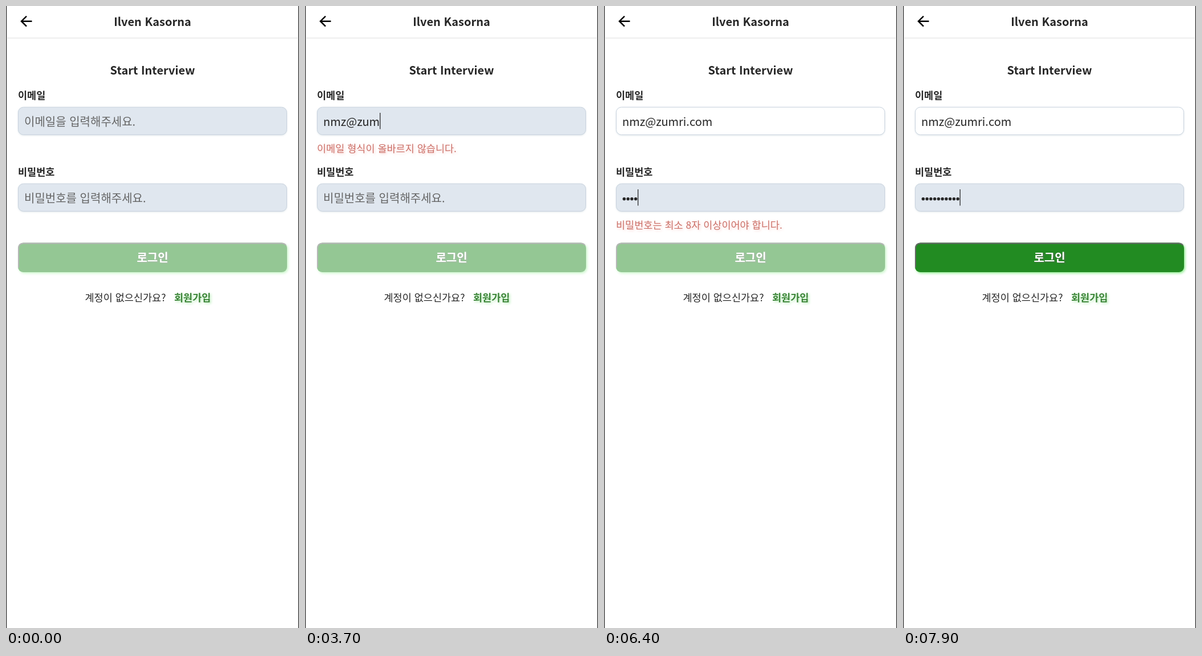
An HTML page for the animation above (8000 ms loop, 514 px wide and 1089 px high).

```html
<!DOCTYPE html>
<html lang="ko">
<head>
<meta charset="utf-8">
<title>Login form</title>
<style>
  html, body { margin: 0; width: 100%; height: 100%; overflow: hidden; background: #fff; }
  svg { display: block; width: 514px; height: 1089px;
        font: 17.5px "Noto Sans CJK KR", "Noto Sans CJK", "Noto Sans CJK JP", sans-serif; fill: #262626; }
  text { white-space: pre; }
  .title { font-size: 20px; font-weight: 700; text-anchor: middle; }
  .label { font-weight: 600; }
  .field { fill: #e0e7ef; stroke: #c8d2dd; filter: drop-shadow(0 1px 1.5px rgba(120, 150, 170, .22)); }
  .value { font-size: 20px; }
  .hint { font-size: 20px; fill: #646464; }
  .error { fill: #cb7068; filter: drop-shadow(2px 2px 2px rgba(240, 110, 100, .3)); }
  .caret { fill: #2b2b2b; }
  .link { font-weight: 600; fill: #3c8438; filter: drop-shadow(2px 2px 2px rgba(130, 225, 130, .6)); }
  .face { fill: #228b22; filter: drop-shadow(2px 2px 2px #90ee90); }
  .edge { fill: none; stroke: #68656a; stroke-width: 2; }
  .action { font-size: 20px; font-weight: 600; fill: #fff; text-anchor: middle;
            filter: drop-shadow(2px 1px 1px rgba(95, 100, 95, .75)); }
</style>
</head>
<body>
<svg viewBox="0 0 514 1089">
  <path d="M.6 0V1089M513.4 0V1089" stroke="#303030" stroke-width="1.3"/>
  <path d="M1.5 56.2H512.5" stroke="#e4e4e4" stroke-width="1.3"/>
  <path d="M45.5 26.7H27.5M36 17.8L27 26.7L36 35.6" fill="none" stroke="#000" stroke-width="2.5"/>
  <text class="title" x="257" y="35">Ilven Kasorna</text>
  <text class="title" x="257" y="119.5">Start Interview</text>

  <text class="label" x="21" y="162.7">이메일</text>
  <rect class="field" id="emailField" x="21.5" y="177.2" width="471" height="48.2" rx="9"/>
  <text class="hint" id="emailHint" x="32" y="209.5">이메일을 입력해주세요.</text>
  <text class="value" id="email" x="32" y="209.5"></text>
  <rect class="caret" id="emailCaret" y="187" width="1.3" height="28.5"/>
  <text class="error" id="emailError" x="21" y="256.3">이메일 형식이 올바르지 않습니다.</text>

  <text class="label" x="21" y="297.2">비밀번호</text>
  <rect class="field" x="21.5" y="311.2" width="471" height="48.2" rx="9"/>
  <text class="hint" id="passwordHint" x="32" y="343.5">비밀번호를 입력해주세요.</text>
  <g id="dots"></g>
  <rect class="caret" id="passwordCaret" y="321" width="1.3" height="28.5"/>
  <text class="error" id="passwordError" x="21" y="390.3">비밀번호는 최소 8자 이상이어야 합니다.</text>

  <g id="login">
    <rect class="face" x="21" y="414.5" width="472" height="51.5" rx="9"/>
    <path class="edge" d="M22 458V424.5Q22 415.5 31 415.5H483Q489 415.5 491 419"/>
    <text class="action" x="257" y="448.3">로그인</text>
  </g>
  <text x="138.5" y="517">계정이 없으신가요?</text>
  <text class="link" x="295" y="517">회원가입</text>
</svg>
<script>
  const LOOP = 8000, BLINK = 500;
  const ADDRESS = "nmz@zumri.com";
  const EMAIL = { focus: 1500, start: 2800, step: 150, count: ADDRESS.length, valid: 12 };
  const PASSWORD = { focus: 4850, start: 5600, step: 233.3, count: 10, valid: 8 };
  const DOT_STEP = 6.75, TEXT_X = 32;
  const FADE = 300;

  const $ = id => document.getElementById(id);
  const clamp = v => Math.max(0, Math.min(1, v));
  const smooth = v => v * v * (3 - 2 * v);
  const show = (id, on) => $(id).setAttribute("visibility", on ? "visible" : "hidden");
  const mix = (a, b, p) => a.map((v, i) => Math.round(v + (b[i] - v) * p));

  const typedAt = (field, n) => field.start + (n - 1) * field.step;
  const typedCount = (field, t) =>
    t < field.start ? 0 : Math.min(field.count, 1 + Math.floor((t - field.start) / field.step));

  // The blink restarts with each typed character.
  function caretOn(field, t, blur) {
    if (t < field.focus || t >= blur) return false;
    const n = typedCount(field, t);
    const since = n ? typedAt(field, n) : field.focus;
    return Math.floor((t - since) / BLINK) % 2 === 0;
  }

  for (let i = 0; i < PASSWORD.count; i++) {
    const dot = document.createElementNS("http://www.w3.org/2000/svg", "circle");
    dot.setAttribute("cx", TEXT_X + (i + .5) * DOT_STEP);
    dot.setAttribute("cy", 337.8);
    dot.setAttribute("r", 2.75);
    $("dots").append(dot);
  }

  function draw(t) {
    const letters = typedCount(EMAIL, t), dots = typedCount(PASSWORD, t);

    $("email").textContent = ADDRESS.slice(0, letters);
    show("emailHint", !letters);
    show("emailError", letters > 0 && letters < EMAIL.valid);
    show("emailCaret", caretOn(EMAIL, t, PASSWORD.focus));
    $("emailCaret").setAttribute("x", TEXT_X + (letters ? $("email").getComputedTextLength() : 0));
    const blurred = smooth(clamp((t - PASSWORD.focus) / FADE));
    $("emailField").style.fill = `rgb(${mix([224, 231, 239], [255, 255, 255], blurred)})`;

    show("passwordHint", !dots);
    show("passwordError", dots > 0 && dots < PASSWORD.valid);
    show("passwordCaret", caretOn(PASSWORD, t, LOOP));
    $("passwordCaret").setAttribute("x", TEXT_X + dots * DOT_STEP);
    [...$("dots").children].forEach((dot, i) =>
      dot.setAttribute("visibility", i < dots ? "visible" : "hidden"));

    const enabled = smooth(clamp((t - typedAt(PASSWORD, PASSWORD.valid)) / FADE));
    $("login").style.opacity = .48 + .52 * enabled;
  }

  const origin = performance.now();
  function tick() {
    draw((performance.now() - origin) % LOOP);
    requestAnimationFrame(tick);
  }
  tick();
</script>
</body>
</html>
```
